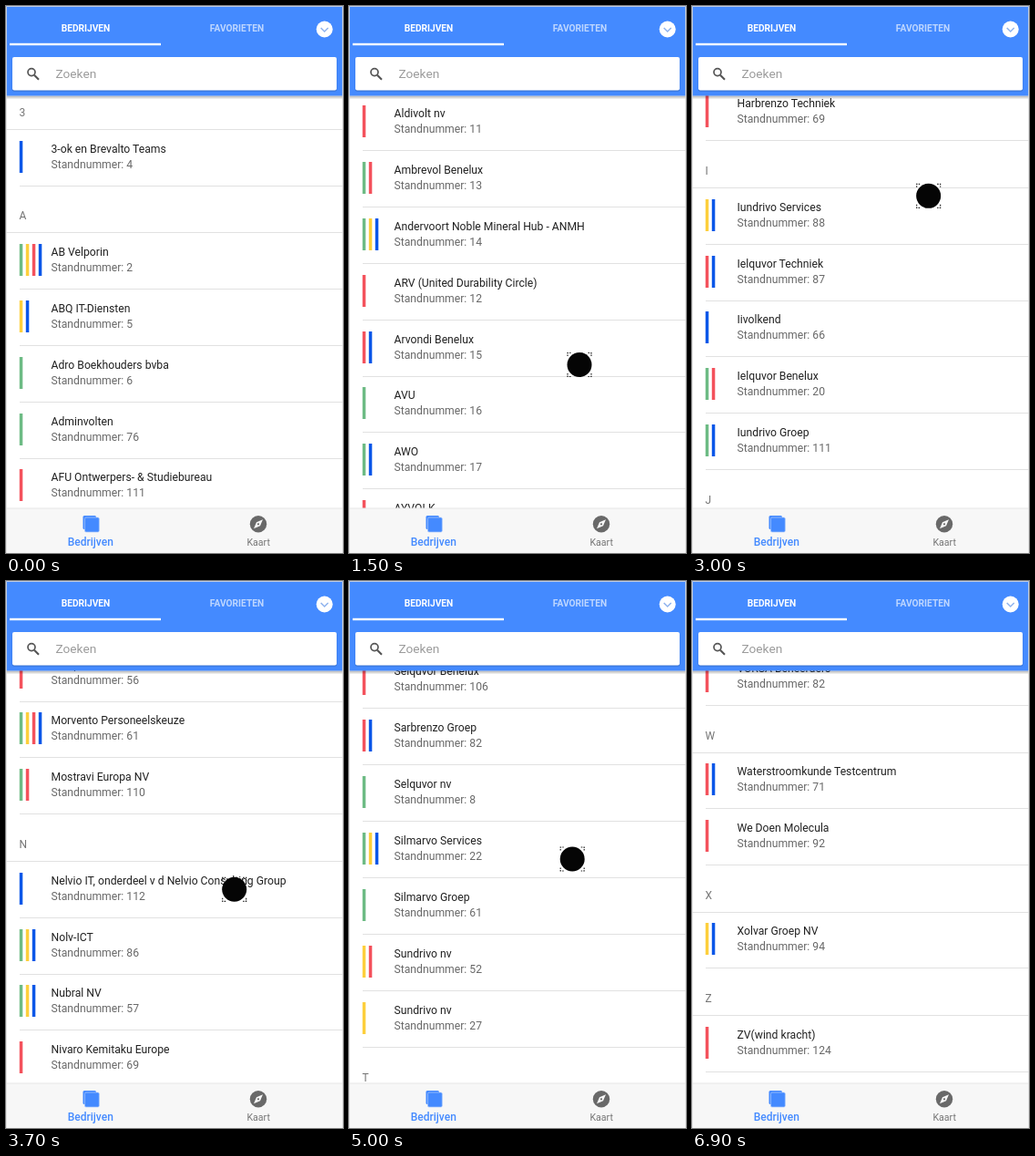
Animation, 370 px wide and 600 px high, one loop 7200 ms. Source, as an HTML page:

```html
<!DOCTYPE html>
<html lang="nl">
<head>
<meta charset="utf-8">
<title>Bedrijven</title>
<style>
html, body { margin: 0; width: 100%; height: 100%; overflow: hidden; background: #fff; }
svg { display: block; width: 370px; height: 600px; font-family: Roboto, sans-serif; }
.name { font-size: 12.2px; fill: #212121; }
.stand { font-size: 12.2px; fill: #686868; }
.letter { font-size: 12px; fill: #757575; }
.tab { font-size: 10.2px; font-weight: 700; fill: #fff; text-anchor: middle; }
</style>
</head>
<body>
<svg viewBox="0 0 370 600">
  <defs>
    <linearGradient id="fade" x1="0" y1="0" x2="0" y2="1">
      <stop offset="0" stop-color="#000" stop-opacity=".3"/>
      <stop offset="1" stop-color="#000" stop-opacity="0"/>
    </linearGradient>
  </defs>
  <rect width="370" height="600" fill="#fff"/>
  <g id="list"></g>

  <g id="top">
    <rect y="98.5" width="370" height="4" fill="url(#fade)"/>
    <rect width="370" height="98.5" fill="#448aff"/>
    <text class="tab" x="87.5" y="28">BEDRIJVEN</text>
    <text class="tab" x="253.5" y="28" opacity=".65">FAVORIETEN</text>
    <rect x="4" y="40.8" width="166" height="2.4" fill="#fff"/>
    <circle cx="349.7" cy="25.5" r="9" fill="#fff"/>
    <path d="M345.7 24l4 4 4-4" fill="none" stroke="#8fb3ee" stroke-width="1.5"/>
    <rect x="6.7" y="57" width="356.6" height="36.8" rx="2" fill="#000" opacity=".16"/>
    <rect x="7" y="56" width="356" height="36.5" rx="2" fill="#fff"/>
    <circle cx="28" cy="72.6" r="4" fill="none" stroke="#555" stroke-width="1.7"/>
    <path d="M31 75.7l5 5" stroke="#555" stroke-width="2.1"/>
    <text x="54.5" y="79" font-size="13.7" fill="#9b9b9b">Zoeken</text>
  </g>

  <g id="nav">
    <rect y="551" width="370" height="49" fill="#f7f7f7"/>
    <rect y="550.5" width="370" height="1" fill="#e8e8e8"/>
    <rect x="84.5" y="559" width="14.5" height="15" rx="1.5" fill="#448aff"/>
    <rect x="86.5" y="561" width="15.8" height="16" rx="1.5" fill="#448aff" stroke="#a9c8fb" stroke-width=".7"/>
    <text x="92.8" y="592" font-size="12" font-weight="500" fill="#448aff" text-anchor="middle">Bedrijven</text>
    <circle cx="277" cy="568.3" r="9.2" fill="#696969"/>
    <path d="M282 563.3l-3 7-7 3 3-7z" fill="#f7f7f7"/>
    <circle cx="277" cy="568.3" r="1.1" fill="#696969"/>
    <text x="277.2" y="592" font-size="10.6" fill="#757575" text-anchor="middle">Kaart</text>
  </g>

  <g id="cursor">
    <circle r="13.5" fill="#050505"/>
    <path fill="none" stroke="#222" stroke-width="1.2" stroke-dasharray="1.6 1.2"
      d="M-13-9.5v-3.5h3.5M9.5-13h3.5v3.5M13 9.5v3.5h-3.5M-9.5 13h-3.5v-3.5"/>
  </g>
  <path d="M.5 600V.5H369.5V600" fill="none" stroke="#dedede" stroke-opacity=".8"/>
</svg>
<script>
// name|stand|bars ; "*X n" adds n made-up companies under letter X
const DATA = `3-ok en Brevalto Teams|4|b
AB Velporin|2|gyrb
ABQ IT-Diensten|5|yb
Adro Boekhouders bvba|6|g
Adminvolten|76|g
AFU Ontwerpers- & Studiebureau|111|r
*A 4
Aldivolt nv|11|r
Ambrevol Benelux|13|gr
Andervoort Noble Mineral Hub - ANMH|14|gyb
ARV (United Durability Circle)|12|r
Arvondi Benelux|15|rb
AVU|16|g
AWO|17|gb
AYVOLK|18|r
*A 1
*B 9
*C 7
Crinvo groep|104|yb
Cubrivalto Services|38|yb
Dalvori|34|b
De Bladenhof Uitgevers|32|gyb
Dorpslab07 nv|42|yrb
Elvaron Group NV|33|rb
*E 5
*F 3
*G 3
*H 2
*I 5
*J 2
*K 3
*L 3
*M 4
Molquando|56|r
Morvento Personeelskeuze|61|gyrb
Mostravi Europa NV|110|gr
Nelvio IT, onderdeel v d Nelvio Consulting Group|112|b
Nolv-ICT|86|gyb
Nubral NV|57|gyb
Nivaro Kemitaku Europe|69|r
*N 1
*O 3
*P 4
Pralundo Techniek|81|gyrb
Prolventi Besturing Systems nv|123|rb
Prunvar & Holtken|70|r
Provisor Teunis|58|gyb
PVU Zeehaven / MQTE|72|grb
Quorvex@Tempo|73|yb
*R 4
*S 9
*T 7
Trivalt A Services|98|
Ulvenor|97|r
Undrio NV|30|gyrk
Usolvant|96|b
Van Dolvere Trading nv|91|
Vandrecht Zorg & Polissen|95|gb
*V 3
VURSA Beheerders|82|r
Waterstroomkunde Testcentrum|71|rb
We Doen Molecula|92|r
Xolvar Groep NV|94|yb
ZV(wind kracht)|124|r`;

const COLORS = { g: '#6dbb84', y: '#fdcf3c', r: '#f4525c', b: '#0b57e8', k: '#8a8a8a' };
const ROW = 61.9, PLAIN_ROW = 57, HEAD = 51.5, ORIGIN = 84, LOOP = 7200, STEP = 100;

let seed = 11;
const rand = () => (seed = (seed * 16807) % 2147483647) / 2147483647;
const pick = a => a[Math.floor(rand() * a.length)];
const invent = letter => ({
  name: letter + pick(['orvanto', 'elquvor', 'undrivo', 'ivolkend', 'arbrenzo', 'ilmarvo']) +
    pick(['', ' nv', ' Groep', ' Services', ' Benelux', ' Techniek']),
  stand: 7 + Math.floor(rand() * 117),
  bars: [...'gyrb'].filter(() => rand() < .42).join('') || 'r'
});

const companies = DATA.split('\n').flatMap(line => {
  if (line[0] === '*') return Array.from({ length: +line.slice(3) }, () => invent(line[1]));
  const [name, stand, bars] = line.split('|');
  return [{ name, stand, bars }];
});

const $ = id => document.getElementById(id);
function add(parent, tag, attrs, text) {
  const el = document.createElementNS('http://www.w3.org/2000/svg', tag);
  for (const k in attrs) el.setAttribute(k, attrs[k]);
  if (text) el.textContent = text;
  parent.appendChild(el);
  return el;
}

const items = [], tops = {};
let end = 0;
function addItem(height, lineX) {
  const el = add($('list'), 'g', {});
  add(el, 'rect', { x: lineX, y: Math.round(height) - 1, width: 370 - lineX, height: 1, fill: '#e1e1e1' });
  items.push({ el, top: end });
  end += height;
  return el;
}

let letter = '';
for (const c of companies) {
  if (c.name[0] !== letter) {
    letter = c.name[0];
    add(addItem(HEAD, 0), 'text', { class: 'letter', x: 14.5, y: 37 }, letter);
  }
  tops[c.name] = end;
  const row = addItem(c.bars ? ROW : PLAIN_ROW, 15);
  [...c.bars].forEach((b, i) =>
    add(row, 'rect', { x: 14.8 + i * 7, y: 12, width: 3.5, height: 35, fill: COLORS[b] }));
  add(row, 'text', { class: 'name', x: 49.5, y: 25 }, c.name);
  add(row, 'text', { class: 'stand', x: 49.5, y: 41.5 }, 'Standnummer: ' + c.stand);
}

const scrollTo = (name, y) => tops[name] + ORIGIN - y;
// time, scroll, swipes used to get there
const stops = [
  [300, 0, 0],
  [1500, scrollTo('Aldivolt nv', 97), 2],
  [2300, scrollTo('Crinvo groep', 102), 1],
  [3700, scrollTo('Morvento Personeelskeuze', 132.4), 2],
  [4500, scrollTo('Prolventi Besturing Systems nv', 133), 1],
  [5600, scrollTo('Ulvenor', 184), 2],
  [6900, scrollTo('Waterstroomkunde Testcentrum', 188), 2]
];
// time, x, y
const path = [
  [300, 262, 470], [400, 250, 410], [650, 250, 180], [950, 253, 400], [1200, 254, 190],
  [1500, 253, 393.5], [1700, 275, 170], [2000, 325, 390], [2300, 337.5, 182], [2600, 290, 400],
  [2900, 262, 170], [3500, 248, 400], [3700, 250.7, 338.3], [3900, 256, 170], [4300, 250, 390],
  [4500, 251.5, 245.3], [4650, 252, 160], [4900, 246, 395], [5150, 244, 170], [5400, 236, 400],
  [5600, 234.5, 220.5], [5750, 236, 150], [6100, 240, 400], [6350, 245, 180], [6700, 255, 420]
];

function segment(keys, t) {
  let i = 1;
  while (i < keys.length - 1 && t >= keys[i][0]) i++;
  const a = keys[i - 1], b = keys[i];
  return { a, b, p: Math.min(1, Math.max(0, (t - a[0]) / (b[0] - a[0]))) };
}
const mix = (a, b, p) => a + (b - a) * p;
const fling = u => 1 - (1 - u) ** 1.7;

function scrollAt(t) {
  const { a, b, p } = segment(stops, t), n = b[2], k = Math.floor(p * n);
  return mix(a[1], b[1], (k + fling(p * n - k)) / n);
}

function draw(t) {
  const scroll = scrollAt(t);
  for (const { el, top } of items) {
    const y = Math.round(top + ORIGIN - scroll), shown = y > 30 && y < 560;
    el.style.display = shown ? '' : 'none';
    if (shown) el.setAttribute('transform', `translate(0 ${y})`);
  }
  const { a, b, p } = segment(path, t);
  $('cursor').style.display = t >= 300 && t < 6700 ? '' : 'none';
  $('cursor').setAttribute('transform', `translate(${mix(a[1], b[1], p)} ${mix(a[2], b[2], p)})`);
}

const start = performance.now();
function tick() {
  const t = (performance.now() - start) % LOOP;
  draw(Math.floor(t / STEP) * STEP);
  requestAnimationFrame(tick);
}
tick();
</script>
</body>
</html>
```
